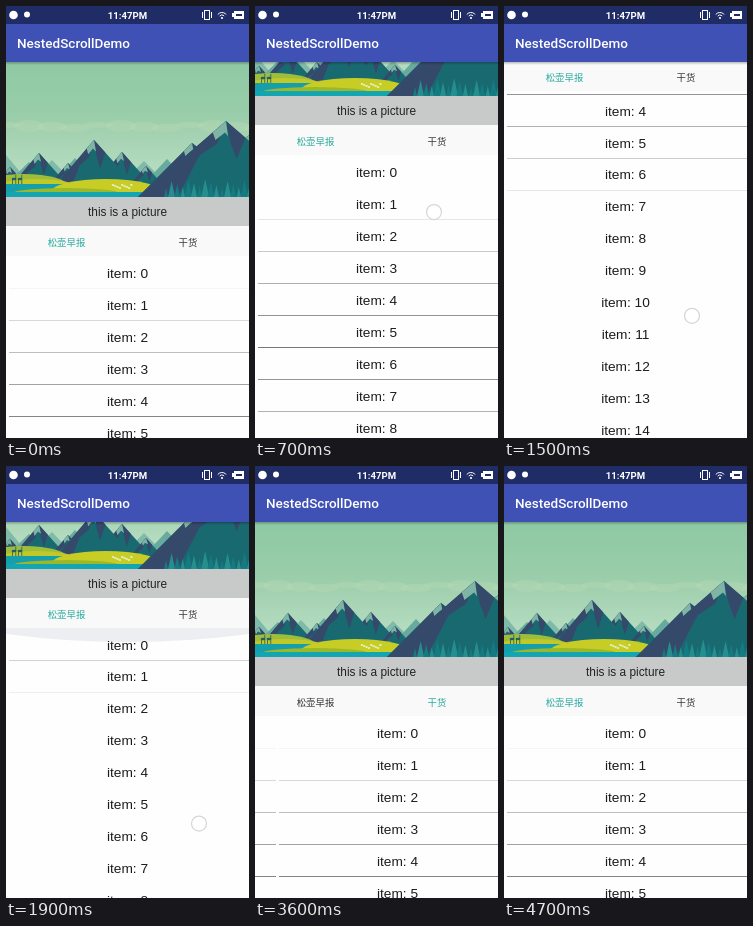
Recreate the animation shown at these times as an HTML page with a canvas. Size 243x432 px, loop 4.9 s.

```html
<!DOCTYPE html>
<html lang="zh">
<head>
<meta charset="utf-8">
<title>Nested scroll</title>
<style>
html, body { margin: 0; width: 100%; height: 100%; overflow: hidden; background: #fff; }
canvas { display: block; }
</style>
</head>
<body>
<canvas id="stage" width="243" height="432"></canvas>
<script>
const W = 243, H = 432, LOOP = 4900, STEP = 100;
const STATUS = 18, BAR_BOTTOM = 56, CAPTION_TOP = 191, TAB_TOP = 220, TAB_HEIGHT = 30;
const HEADER = 164.6, FULL_SCROLL = 481.1;
const ROW = 31.94, FIRST_ROW = 267.3;
const SANS = '"Liberation Sans", Arial, sans-serif';
const ctx = document.getElementById('stage').getContext('2d');

// Eased progress from 0 to 1 between two times
function ease(t, from, to) {
  const u = Math.min(1, Math.max(0, (t - from) / (to - from)));
  return u * u * u * (u * (6 * u - 15) + 10);
}

// Up, fling back to the list top, then pull the header out again
const scrollAt = t => FULL_SCROLL * ease(t, 400, 1300)
  - (FULL_SCROLL - HEADER) * ease(t, 1300, 1660)
  - HEADER * ease(t, 1660, 2160);
const pageAt = t => W * (ease(t, 3300, 3692) - ease(t, 3800, 4200));
const glowAt = t => ease(t, 1500, 1700) - ease(t, 1900, 2100);

// The finger moves with whatever it drags
function touchAt(t, scroll, page) {
  const during = (from, to) => t >= from && t <= to;
  if (during(300, 700)) return [179, 307 - scroll];
  if (during(1400, 1500)) return [188, 600 - scroll];
  if (during(1700, 1900)) return [193, 446 - scroll];
  if (during(3300, 3500)) return [205 - page, 320];
  if (during(3900, 4000)) return [255 - page, 320];
}

function rect(x, y, w, h, color) {
  ctx.fillStyle = color;
  ctx.fillRect(x, y, w, h);
}

function poly(color, ...points) {
  ctx.fillStyle = color;
  ctx.beginPath();
  for (let i = 0; i < points.length; i += 2) ctx.lineTo(points[i], points[i + 1]);
  ctx.fill();
}

function ellipse(x, y, rx, ry, color) {
  ctx.fillStyle = color;
  ctx.beginPath();
  ctx.ellipse(x, y, rx, ry, 0, 0, Math.PI * 2);
  ctx.fill();
}

function text(str, x, y, font, color, align = 'center') {
  ctx.font = font;
  ctx.fillStyle = color;
  ctx.textAlign = align;
  ctx.fillText(str, x, y);
}

function vertical(y0, y1, ...colors) {
  const g = ctx.createLinearGradient(0, y0, 0, y1);
  colors.forEach((c, i) => g.addColorStop(i / (colors.length - 1), c));
  return g;
}

function clipped(x, y, w, h, paint) {
  ctx.save();
  ctx.beginPath();
  ctx.rect(x, y, w, h);
  ctx.clip();
  paint();
  ctx.restore();
}

function mountain(x, y, left, right) {
  const h = CAPTION_TOP - y, foot = CAPTION_TOP;
  poly('#196971', x, y, x + right, foot, x - left, foot);
  poly('#35496a', x, y, x - left * 0.1, y + h * 0.3, x - left * 0.3, y + h * 0.45, x - left * 0.55, foot, x - left, foot);
  poly('#35496a', x, y, x + right * 0.22, y + h * 0.22, x + right * 0.12, y + h * 0.5, x + right * 0.05, y + h * 0.28);
  poly('#80b5a6', x, y, x + 2, y + h * 0.2, x - 1, y + h * 0.15, x - left * 0.12, y + h * 0.25, x - left * 0.15, y + h * 0.15);
}

function hill(color, x, y, w, h) {
  clipped(0, 0, W, y, () => ellipse(x, y, w / 2, h, color));
}

function drawLandscape() {
  rect(0, BAR_BOTTOM, W, 135, vertical(BAR_BOTTOM, 165, '#8ec9a4', '#9acdaa', '#b6dcc0'));
  for (let i = 0; i < 12; i++) {
    ellipse(i * 23, 119 + i * 5 % 4, 15, 3 + i * 7 % 4, 'rgba(186,217,180,.4)');
  }
  for (let i = 0; i < 11; i++) {
    const x = i * 23, peak = 149 + i * 7 % 9;
    poly(i % 2 ? '#67aa9e' : '#7fbba8', x, peak, x + 30, 185, x - 30, 185);
  }
  for (const [x, y] of [[4, 161], [33, 147], [62, 157], [116, 146], [140, 160], [88, 134]]) {
    mountain(x, y, (CAPTION_TOP - y) * 0.85, (CAPTION_TOP - y) * 0.9);
  }

  hill('#9ebd3d', 18, 181, 90, 13);
  hill('#c0c928', 30, 182, 85, 9);
  rect(0, 178, 95, 13, '#159fac');
  hill('#c7cd25', 100, 187, 112, 14);
  hill('#9bb82b', 60, 187, 105, 5);
  rect(0, 186, 150, 5, '#13a5b1');
  for (let i = 0; i < 9; i++) ellipse(107 + i * 2.3, 179 + i * 5 % 4, 1.3, 0.9, '#e7edc7');
  for (const x of [8, 14]) {
    ellipse(x, 173, 2.4, 1.3, '#245f66');
    rect(x - 2, 173, 0.8, 5, '#245f66');
    rect(x + 1.4, 169, 0.8, 9, '#245f66');
  }

  mountain(243, 129, 75, 60);
  mountain(186, 137, 54, 70);
  mountain(220, 115, 88, 88);
  for (let i = 0; i < 16; i++) {
    const x = 160 + i * 5.6, h = 9 + i * 7 % 10;
    poly(i % 2 ? '#258f8e' : '#157b83', x, CAPTION_TOP - h, x + h * 0.22, CAPTION_TOP, x - h * 0.22, CAPTION_TOP);
  }
}

function drawHeader(scroll) {
  const shift = Math.round(Math.min(scroll, HEADER));
  clipped(0, BAR_BOTTOM, W, H, () => {
    ctx.translate(0, -shift);
    clipped(0, BAR_BOTTOM, W, CAPTION_TOP - BAR_BOTTOM, drawLandscape);
    rect(0, CAPTION_TOP, W, TAB_TOP - CAPTION_TOP, '#c8caca');
    text('this is a picture', 121.5, 210, `11.85px ${SANS}`, '#222');
  });
  return TAB_TOP - shift;
}

function drawTabs(top, page) {
  rect(0, top, W, TAB_HEIGHT, '#f9f9f9');
  const second = page > W / 2;
  const font = '9.4px "Noto Sans CJK SC", "Noto Sans CJK", sans-serif';
  text('松壶早报', 60.5, top + 19.6, font, second ? '#333' : '#26a99d');
  text('干货', 182, top + 19.6, font, second ? '#26a99d' : '#333');
}

function drawList(scroll, left) {
  for (let i = 0; i < 50; i++) {
    const y = FIRST_ROW + i * ROW - scroll;
    if (y < 30 || y > H + 20) continue;
    text('item: ' + i, left + 121.5, Math.round(y + 4.7), `13.7px ${SANS}`, '#1c1c1c');
    // thin divider: its strength depends on how it meets the pixel grid
    const line = y + ROW / 2, row = Math.round(line);
    const alpha = Math.max(0, 0.58 - 2 * Math.abs(line - row));
    rect(left + 3, row - 1, W - 3, 1, `rgba(20,24,30,${alpha})`);
  }
}

function drawGlow(top, strength) {
  ctx.fillStyle = `rgba(63,81,125,${0.09 * strength})`;
  ctx.beginPath();
  ctx.moveTo(0, top);
  ctx.lineTo(0, top + 6);
  ctx.quadraticCurveTo(W / 2, top + 22, W, top + 6);
  ctx.lineTo(W, top);
  ctx.fill();
}

function drawStatusIcons() {
  ellipse(7.5, 9, 4.3, 4.3, '#fff');
  ellipse(21, 8.5, 3, 3, '#fff');
  ctx.strokeStyle = '#fff';
  ctx.lineWidth = 1;
  ctx.strokeRect(198.5, 4.5, 5, 9);
  for (const x of [196, 205]) rect(x, 6, 1, 6, '#fff');
  for (const r of [3, 5.5]) {
    ctx.beginPath();
    ctx.arc(216, 12, r, Math.PI * 1.22, Math.PI * 1.78);
    ctx.stroke();
  }
  ellipse(216, 12, 1.1, 1.1, '#fff');
  rect(228, 5, 10, 8, '#fff');
  rect(226, 7, 2, 4, '#fff');
  rect(230, 8, 6, 2, '#1f2c66');
}

function drawBars() {
  rect(0, BAR_BOTTOM, W, 3, vertical(BAR_BOTTOM, BAR_BOTTOM + 3, 'rgba(0,0,0,.25)', 'rgba(0,0,0,0)'));
  rect(0, STATUS, W, BAR_BOTTOM - STATUS, '#3f51b5');
  rect(0, 0, W, STATUS, '#1f2c66');
  text('11:47PM', 121.5, 12.5, 'bold 9.6px Roboto, sans-serif', '#fff');
  text('NestedScrollDemo', 11, 41.5, '500 13.5px Roboto, sans-serif', '#fff', 'left');
  drawStatusIcons();
}

function drawTouch(point) {
  if (!point) return;
  ellipse(...point, 7.5, 7.5, 'rgba(255,255,255,.7)');
  ctx.strokeStyle = '#d6d6d8';
  ctx.lineWidth = 1.2;
  ctx.stroke();
}

function draw(t) {
  const scroll = scrollAt(t), page = pageAt(t);
  rect(0, 0, W, H, '#fefefe');
  const tabTop = drawHeader(scroll), listTop = tabTop + TAB_HEIGHT;
  clipped(0, listTop, W, H, () => {
    drawGlow(listTop, glowAt(t));
    for (const left of [-page, W - page]) drawList(scroll, Math.round(left));
  });
  drawTabs(tabTop, page);
  drawBars();
  drawTouch(touchAt(t, scroll, page));
}

const start = performance.now();
function tick() {
  const t = (performance.now() - start) % LOOP;
  draw(Math.floor(t / STEP) * STEP);
  requestAnimationFrame(tick);
}
tick();
</script>
</body>
</html>
```
